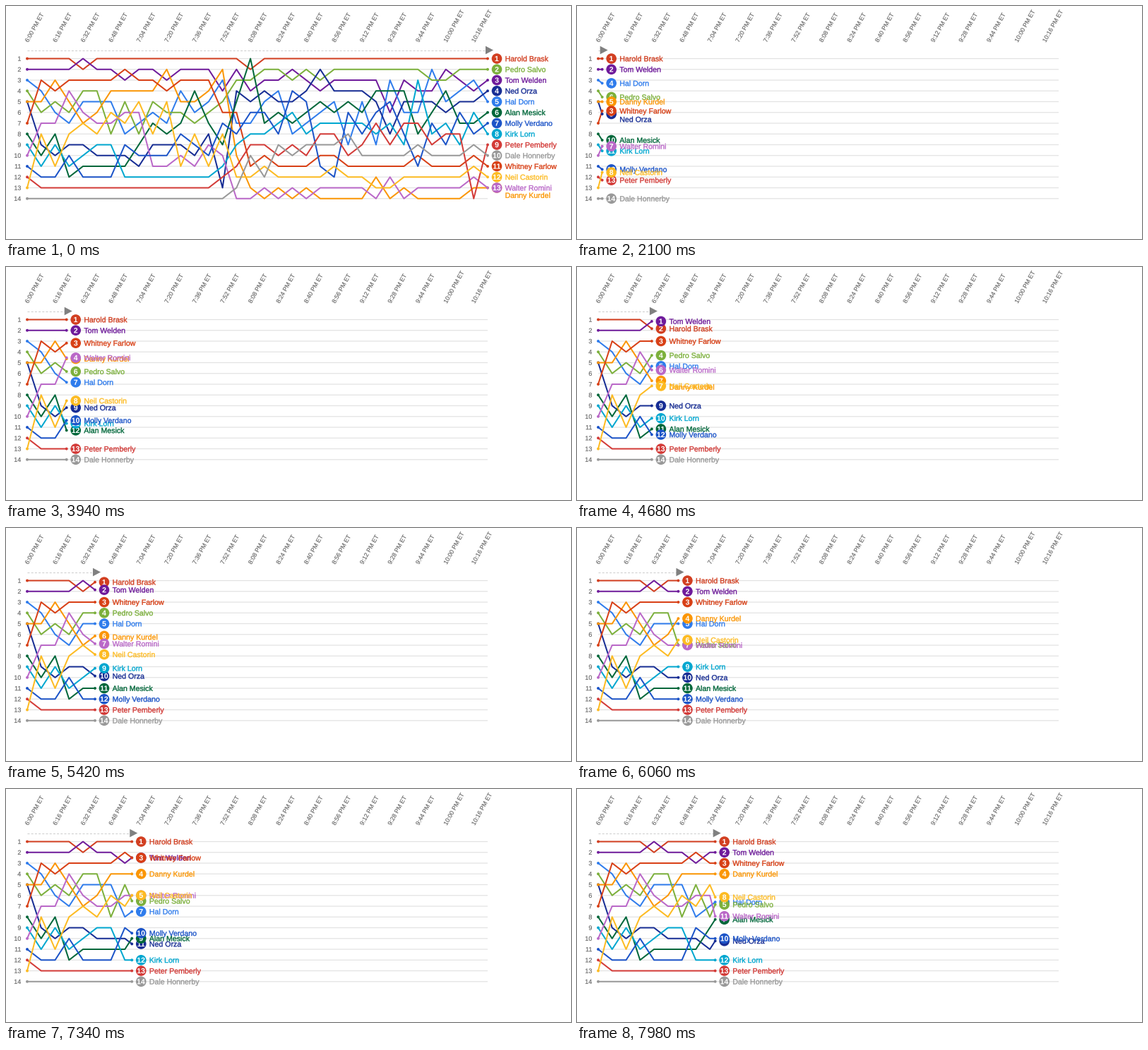
A matplotlib script for the animation above (8000 ms loop, 800x330 px).

```python
import math

import numpy as np
import matplotlib.pyplot as plt
from matplotlib.animation import FuncAnimation
from matplotlib.collections import LineCollection
from matplotlib.patches import PathPatch, Polygon, Rectangle
from matplotlib.path import Path
from matplotlib.textpath import TextPath
from matplotlib.transforms import Affine2D

W, H, DPI = 800, 330, 100
PX = 72 / DPI                      # one pixel in points
STEP_MS, LOOP_MS = 20, 8000
LEFT, RIGHT, TOP, ROW = 30, 682, 74.5, 15.25
COLS, RACERS = 33, 14
COL = (RIGHT - LEFT) / COLS
AXIS = np.arange(COLS + 1)
ARROW_Y = 62.5
TIE_SHIFT = 10.5

OUT_END, IN_START, IN_END = 700, 920, 1620
RUN_START, COL_MS = 1892, 726

OPENING = 10                       # columns with given ranks
BREAK = (13, 16)                   # columns where the field regroups

fig = plt.figure(figsize=(W / DPI, H / DPI), dpi=DPI, facecolor="white")
ax = fig.add_axes([0, 0, 1, 1])
ax.set_xlim(0, W)
ax.set_ylim(H, 0)
ax.axis("off")
rng = np.random.default_rng(16)


def glyphs(text, size, weight="normal"):
    """Outline of a text in pixels, y pointing down, baseline at 0."""
    path = TextPath((0, 0), text, size=size,
                    prop={"family": "Liberation Sans", "weight": weight})
    return Affine2D().scale(1, -1).transform_path(path)


def centred(text, size, weight="normal"):
    path = glyphs(text, size, weight)
    box = path.get_extents()
    return Affine2D().translate(-(box.x0 + box.x1) / 2,
                                -(box.y0 + box.y1) / 2).transform_path(path)


def shape(path, color, z, edge=0.0):
    patch = PathPatch(path, facecolor=color, edgecolor=color,
                      linewidth=edge * PX, zorder=z, snap=False)
    return ax.add_patch(patch)


def row_y(rank):
    return TOP + ROW * (rank - 1)


def draw_axes():
    ranks = range(1, RACERS + 1)
    rows = [[(LEFT, row_y(r)), (RIGHT, row_y(r))] for r in ranks]
    ax.add_collection(LineCollection(rows, colors="#e2e2e2", snap=False,
                                     linewidths=1.2 * PX, zorder=1))
    marks = []
    for r in ranks:
        path = glyphs(str(r), 9)
        shift = Affine2D().translate(21 - path.get_extents().x1, row_y(r) + 3.2)
        marks.append(shift.transform_path(path))
    for col in range(0, COLS, 2):
        minutes = 8 * col
        text = f"{6 + minutes // 60}:{minutes % 60:02d} PM ET"
        turn = Affine2D().rotate_deg(-61).translate(31.5 + COL * col, 52)
        marks.append(turn.transform_path(glyphs(text, 8.7)))
    shape(Path.make_compound_path(*marks), "#666666", 2, 0.15)


NUMBERS = {n: centred(str(n), 10.5, "bold") for n in range(1, RACERS + 1)}


class Racer:
    def __init__(self, z, name, color, finish, *opening):
        self.color, self.finish = color, finish
        hold = [opening[-1]] * (OPENING - len(opening))
        self.opening = np.array([*opening, *hold], float)
        self.line, = ax.plot([], [], color=color, lw=2 * PX, zorder=4,
                             solid_joinstyle="round", snap=False)
        disc = Affine2D().scale(7.3).transform_path(Path.unit_circle())
        label = Affine2D().translate(11.6, 3.8).transform_path(glyphs(name, 10.6))
        self.disc = shape(disc, color, z)
        self.label = shape(label, color, z + 0.2, 0.35)
        self.number = shape(NUMBERS[1], "white", z + 0.4)

    def levels(self):
        """Drift to the finish rank; the middle of the field wanders most."""
        base = np.interp(AXIS, BREAK, (self.opening[-1], self.finish))
        spread = 0.35 + 2.4 * np.sin(np.pi * base / RACERS) ** 6
        return base + spread * rng.normal(size=base.size)

    def set_ranks(self, ranks, later):
        self.ranks = ranks
        self.shift = TIE_SHIFT * sum((ranks == other for other in later),
                                     np.zeros(COLS + 1))

    def move(self, p):
        cols = np.append(np.arange(math.floor(p) + 1), p)
        y = row_y(np.interp(cols, AXIS, self.ranks))
        self.line.set_data(LEFT + COL * cols, y)
        x, tip = LEFT + COL * p + 13, y[-1]
        at = Affine2D().translate(x, tip) + ax.transData
        self.disc.set_transform(at)
        self.number.set_transform(at)
        self.number.set_path(NUMBERS[int(self.ranks[math.ceil(p)])])
        drop = np.interp(p, AXIS, self.shift)
        self.label.set_transform(Affine2D().translate(x, tip + drop) + ax.transData)
        return tip


def rank_field(field):
    """Given ranks first, then the order of the drifting levels."""
    levels = np.array([racer.levels() for racer in field])
    ranks = levels.argsort(axis=0).argsort(axis=0) + 1.0
    ranks[:, :OPENING] = [racer.opening for racer in field]
    ranks[:, -1] = [racer.finish for racer in field]
    for i, racer in enumerate(field):
        racer.set_ranks(ranks[i], ranks[i + 1:])


draw_axes()

# name, colour, finish rank, opening ranks; the last opening rank holds.
# The starting order is also the stacking order.
field = [Racer(10 + z, *entry) for z, entry in enumerate([
    ("Harold Brask", "#d23f21", 1, 1, 1, 1, 1, 2, 1),
    ("Tom Welden", "#6f1b9b", 3, 2, 2, 2, 2, 1, 2, 2, 3, 2),
    ("Hal Dorn", "#2f7cec", 5, 3, 4, 6, 7, 5, 5, 5, 8, 7, 6),
    ("Pedro Salvo", "#7cb03c", 2, 4, 6, 5, 6, 4, 4, 8, 5, 8, 5),
    ("Ned Orza", "#172d94", 4, 5, 9, 10, 9, 9, 10, 10, 10, 11, 9),
    ("Danny Kurdel", "#fb9604", 13, 5, 5, 3, 5, 7, 6, 4),
    ("Whitney Farlow", "#d84016", 11, 7, 3, 4, 3, 3, 3, 3, 2, 3),
    ("Alan Mesick", "#00673a", 6, 8, 10, 8, 12, 11, 11, 11, 11, 9, 7),
    ("Kirk Lorn", "#00a7d0", 8, 9, 11, 9, 11, 10, 9, 9, 12),
    ("Walter Romini", "#ba68c8", 13, 10, 7, 7, 4, 6, 7, 7, 6, 6, 11),
    ("Molly Verdano", "#1c54c8", 7, 11, 12, 12, 10, 12, 12, 12, 9, 10),
    ("Peter Pemberly", "#d33b38", 9, 12, 13),
    ("Neil Castorin", "#fdbb22", 12, 13, 8, 11, 8, 7, 8, 6, 7, 5, 8),
    ("Dale Honnerby", "#999999", 10, 14),
])]
rank_field(field)

colors = [racer.color for racer in field]
starts = [(LEFT, row_y(racer.ranks[0])) for racer in field]
dots = ax.scatter(*zip(*(starts * 2)), s=(3.9 * PX) ** 2, c=colors * 2,
                  linewidths=0, zorder=5)
trail, = ax.plot([], [], color="#cccccc", lw=PX, dashes=(3, 2.2), zorder=3,
                 dash_capstyle="butt")
arrow = ax.add_patch(Polygon([(-3, -5.8), (8, 0), (-3, 5.8)], facecolor="#808080",
                             edgecolor="none", zorder=6))
cover = ax.add_patch(Rectangle((0, 0), W, H, facecolor="white",
                               edgecolor="none", zorder=100))


def draw(i):
    t = i * STEP_MS
    if t < IN_START:
        p = COLS
        veil = min(t / OUT_END, 1)
    else:
        p = max(0, (t - RUN_START) / COL_MS)
        veil = max(0, 1 - (t - IN_START) / (IN_END - IN_START))
    x = LEFT + COL * p
    tips = [(x, racer.move(p)) for racer in field]
    dots.set_offsets(starts + tips)
    trail.set_data([LEFT, x], [ARROW_Y, ARROW_Y])
    arrow.set_transform(Affine2D().translate(x, ARROW_Y) + ax.transData)
    cover.set_alpha(veil)
    cover.set_visible(veil > 0)
    return []


anim = FuncAnimation(fig, draw, frames=LOOP_MS // STEP_MS, interval=STEP_MS,
                     init_func=lambda: draw(0), repeat=True, repeat_delay=0,
                     blit=False)
plt.show()
```
